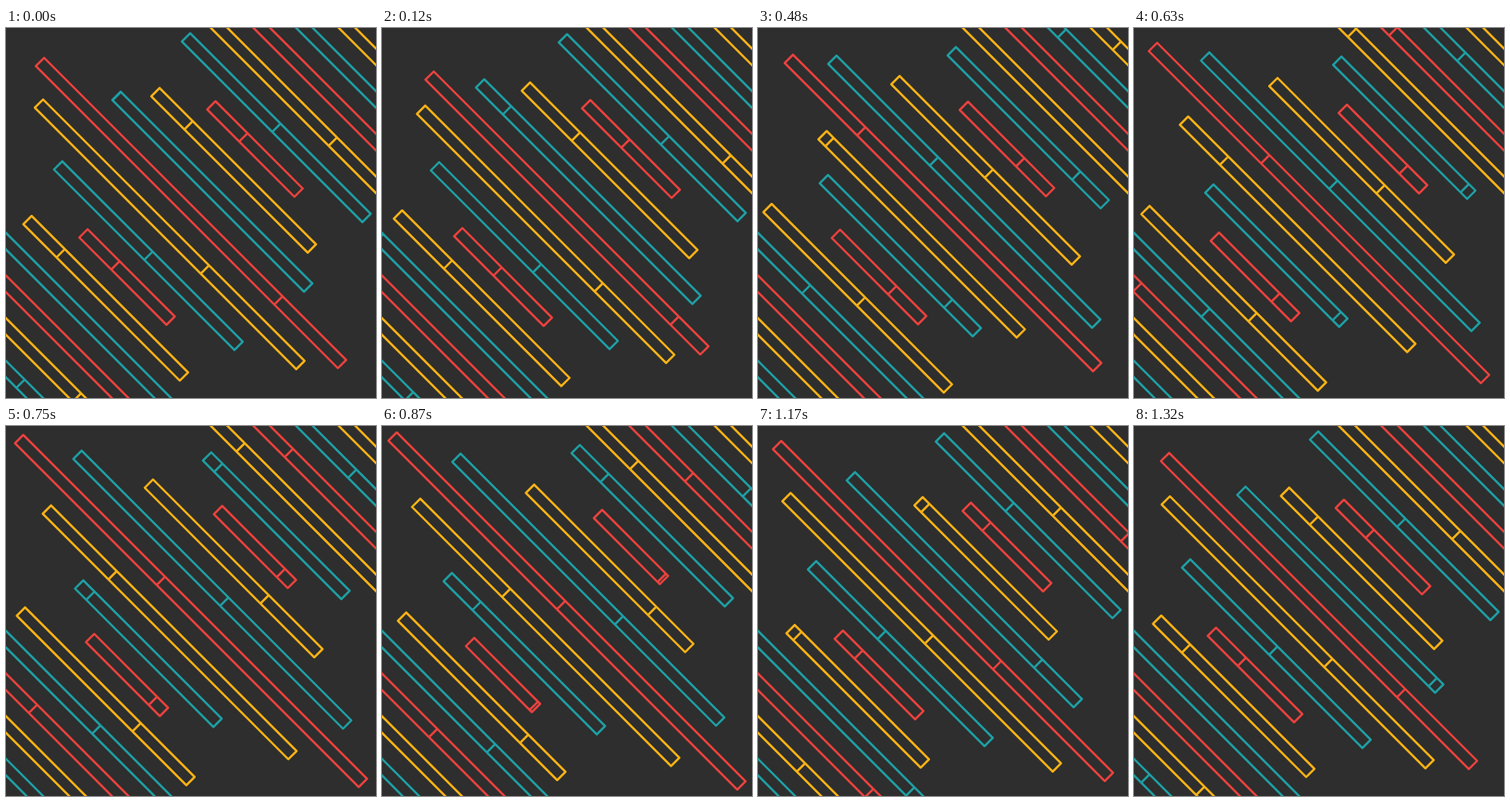
Recreate the animation shown at these times as an HTML page. Size 400x400 px, loop 1350 ms.

```html
<!DOCTYPE html>
<html lang="en">
<head>
<meta charset="utf-8">
<title>Turning bars</title>
<style>
  html, body { margin: 0; width: 100%; height: 100%; overflow: hidden; background: #2d2e2d; }
  svg { display: block; width: 100%; height: 100%; }
  path { fill: none; stroke-width: 2.4; stroke-linejoin: round; }
</style>
</head>
<body>
<svg viewBox="0 0 400 400"><g id="bars" transform="translate(200 200) rotate(45)"></g></svg>
<script>
const LOOP = 1350;
const GAP = 32.6;
const HALF = 6.35;
const COLORS = ['#eb423f', '#1f9fa5', '#fbb317'];
// Half diagonal of each square block, seen edge-on; the pattern repeats every six bars.
const RADII = [266.8, 207, 138, 69, 138, 207];
const group = document.getElementById('bars');
const mod = (a, n) => ((a % n) + n) % n;

const bars = [];
for (let k = -8; k <= 8; k++) {
  const path = document.createElementNS('http://www.w3.org/2000/svg', 'path');
  const kind = mod(k, 6);
  path.setAttribute('stroke', COLORS[mod(k, 3)]);
  path.setAttribute('transform', `translate(0 ${(-k * GAP).toFixed(2)})`);
  group.append(path);
  bars.push({ path, radius: RADII[kind], shift: (kind - 1) / 6 });
}

// A quarter turn per loop: two faces show, parted by the edge nearest the viewer.
function draw(ms) {
  for (const { path, radius, shift } of bars) {
    const turn = mod(ms / LOOP + shift, 1);
    const angle = (turn - 0.5) * Math.PI / 2;
    const end = (radius * Math.cos(angle)).toFixed(2);
    const edge = (radius * Math.sin(angle)).toFixed(2);
    path.setAttribute('d',
      `M${-end} ${-HALF}H${end}V${HALF}H${-end}ZM${edge} ${-HALF}V${HALF}`);
  }
}

const start = performance.now();
function tick() {
  draw((performance.now() - start) % LOOP);
  requestAnimationFrame(tick);
}
draw(0);
requestAnimationFrame(tick);
</script>
</body>
</html>
```
